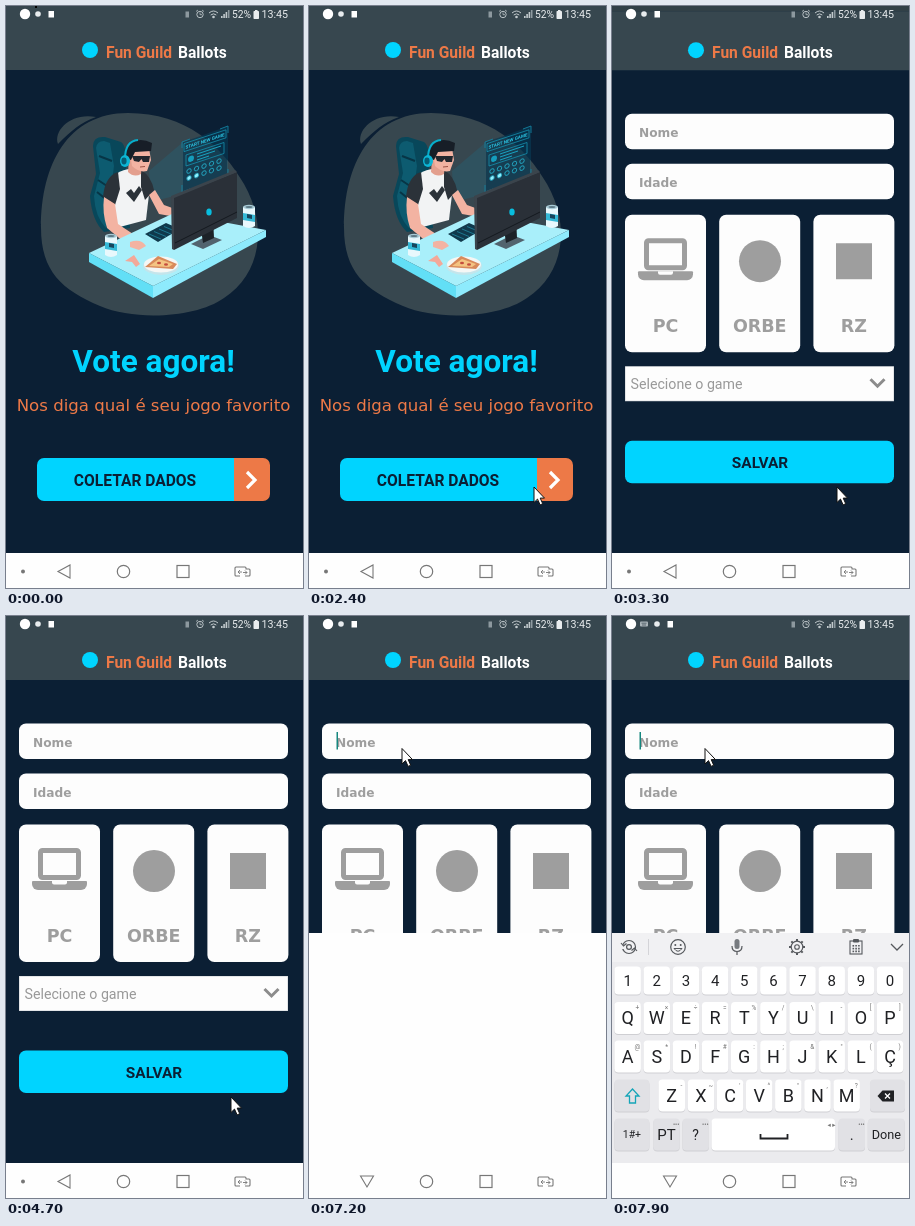
Recreate the animation shown at these times as an HTML page with a canvas. Size 297x582 px, loop 8 s.

```html
<!DOCTYPE html>
<html lang="pt">
<head>
<meta charset="utf-8">
<title>Vote agora</title>
<style>
html, body { margin: 0; width: 100%; height: 100%; overflow: hidden; background: #0b1f34; }
canvas { display: block; width: 297px; height: 582px; }
</style>
</head>
<body>
<canvas id="stage"></canvas>
<script>
const W = 297, H = 582, SCREEN_H = 547, KEYS_TOP = 317;
const LOOP = 8000, STEP = 100;
const NAVY = '#0b1f34', SLATE = '#37474f', CYAN = '#00d4ff', ORANGE = '#ed7947';
const GREY = '#9e9e9e', WHITE = '#fdfdfd', INK = '#55585c', SKIN = '#f3b3a2';
const ROBOTO = 'Roboto, sans-serif', WIDE = '"DejaVu Sans", sans-serif';

const canvas = document.getElementById('stage');
const c = canvas.getContext('2d');
const dpr = window.devicePixelRatio || 1;
canvas.width = W * dpr;
canvas.height = H * dpr;

const clamp = v => Math.max(0, Math.min(1, v));

function rect(color, x, y, w, h, r = 0) {
  c.fillStyle = color;
  c.beginPath();
  c.roundRect(x, y, w, h, r);
  c.fill();
}
function disc(color, x, y, rx, ry = rx) {
  c.fillStyle = color;
  c.beginPath();
  c.ellipse(x, y, rx, ry, 0, 0, 7);
  c.fill();
}
function ring(color, x, y, r, lw = 1) {
  c.strokeStyle = color;
  c.lineWidth = lw;
  c.beginPath();
  c.arc(x, y, r, 0, 7);
  c.stroke();
}
function fill(color, d) {
  c.fillStyle = color;
  c.fill(new Path2D(d));
}
function line(color, d, lw = 1) {
  c.strokeStyle = color;
  c.lineWidth = lw;
  c.stroke(new Path2D(d));
}
function text(s, x, y, font, color, align = 'left') {
  c.font = font;
  c.fillStyle = color;
  c.textAlign = align;
  c.fillText(s, x, y);
}
function group(draw) {
  c.save();
  draw();
  c.restore();
}
function clipBelow(y, h) {
  c.beginPath();
  c.rect(0, y, W, h);
  c.clip();
}

function bezierEase(x1, y1, x2, y2) {
  const at = (s, a, b) => 3 * (1 - s) ** 2 * s * a + 3 * (1 - s) * s * s * b + s ** 3;
  return x => {
    let lo = 0, hi = 1;
    for (let i = 0; i < 24; i++) {
      const mid = (lo + hi) / 2;
      if (at(mid, x1, x2) < x) lo = mid; else hi = mid;
    }
    return at(lo, y1, y2);
  };
}
const revealEase = bezierEase(0.208, 0.82, 0.25, 1);

function header() {
  rect(NAVY, 0, 0, W, SCREEN_H + 15);
  rect(SLATE, 0, -10, W, 74);
  disc(CYAN, 84, 44, 8);
  text('Fun Guild', 100, 52, 'bold 15.6px ' + ROBOTO, ORANGE);
  text('Ballots', 172, 52, 'bold 15.6px ' + ROBOTO, '#fff');
}

function can(x, y) {
  fill('#e9f8fc', `M${x - 6} ${y - 9}h12v19q-6 4-12 0z`);
  fill('#35b9d6', `M${x - 6} ${y - 3}l12 2v7l-12-2z`);
  fill('#17455c', `M${x - 2} ${y - 2}l5 1v4l-5-1z`);
  disc('#a8cbd6', x, y - 9, 6, 2.2);
  disc('#5e7a86', x, y - 9, 3.5, 1.1);
}

function hologram() {
  fill('rgba(0,150,185,.15)', 'M143 165L176 137L222 120V168L168 190L145 196z');
  fill('rgba(6,48,72,.6)', 'M177 136L221 121V169L177 186z');
  line('#1381a0', 'M176 142V136L184 133M214 123L222 120V127M222 163V169L214 172M184 183L176 186V179', .9);
  group(() => {
    c.transform(1, -.33, 0, 1, 177, 136);
    c.strokeStyle = '#1695b4';
    c.lineWidth = .7;
    c.strokeRect(1, 2, 42, 8);
    text('START NEW GAME', 22, 7.8, 'bold 4.6px ' + ROBOTO, '#2bc3e2', 'center');
    c.strokeRect(3, 14, 38, 11);
    disc('#159dbc', 8, 19.5, 3);
    for (let i = 0; i < 3; i++) rect('#1aa5c4', 14, 16 + i * 3, 24 - i * 6, 1.1);
    for (let i = 0; i < 10; i++) ring('#24b2cf', 6 + i % 5 * 7.5, 31 + Math.floor(i / 5) * 7, 2.2, .8);
    disc('#8af0ff', 6, 38, 1.8);
    disc('#8af0ff', 13.5, 38, 1.8);
  });
}

function gamer() {
  // chair
  fill('#08475a', 'M87 140Q87 130 99 131L115 136Q121 140 120 160L124 222L98 226Q86 215 84 190L90 168z');
  fill('#0d5b70', 'M90 142Q91 135 98 135L104 137L108 160L100 222Q89 211 88 190L94 167z');
  line('#073546', 'M93 150L106 155M91 186L101 194M92 174L101 180', 2);
  // body
  fill('#f2f3f4', 'M110 168Q122 160 136 165L144 180L140 214L110 222L106 190z');
  fill('#2b3239', 'M112 166Q99 170 97 191L109 199L114 183z');
  fill('#2b3239', 'M135 164Q145 170 148 184L139 194L135 181z');
  fill('#2b3239', 'M120 187L125 183L128 187L133 180L136 184L128 196z');
  fill(SKIN, 'M98 191L109 198L112 218L139 236Q142 240 137 243L124 241L101 222Q96 207 98 191z');
  fill(SKIN, 'M143 189L149 184L158 199L172 204L170 211L153 208z');
  // head
  fill('#e39f8e', 'M123 153L136 158L135 168Q128 172 122 166z');
  fill(SKIN, 'M123 142H143L145 154L141 165Q133 167 126 160z');
  fill('#171e27', 'M120 152Q117 140 125 137Q134 131 146 137L145 145L129 146L125 154z');
  fill('#22272e', 'M126 150L144 150L143 156L137 156L135.5 153L133 156L128 155z');
  line('#9b5144', 'M134 161L139 160.5', 1);
  line('#07aecb', 'M119 153Q119 135 132 134', 2);
  disc('#0cb6d5', 119, 155, 5, 6);
  disc('#075c73', 118, 155, 2.6, 3.4);
}

function desk() {
  fill('#a9effa', 'M83 247L168 207L260 224L147 280z');
  fill('#62dff6', 'M83 247L147 280V292L83 256z');
  fill('#8eebfd', 'M147 280L260 224V231L147 292z');
  fill('#10394c', 'M139 228L160 217L174 223L152 236z');
  for (let i = 0; i < 4; i++) line('#207f98', `M${143 + i * 5} ${228 - i * 2.5}l12 5`, .9);
  can(105, 239);
  can(243, 210);
  // monitor
  fill('#52636e', 'M185 238L203 229L216 234L197 243z');
  fill('#1c2228', 'M194 216L207 211L208 232L197 237z');
  fill('#2a3038', 'M168 191L231 166V212L168 244z');
  fill('#3b444c', 'M165 190L229 164L231 166L168 192V244L166 243z');
  line('#14191f', 'M169 237L231 206', 1);
  disc('#08bedf', 203, 206, 2.7, 3.5);
  // food
  disc('#c4e5eb', 155, 260, 18, 9);
  disc('#f5f7f5', 155, 258.5, 17, 8);
  fill('#d88a5b', 'M139 261L152 250L171 258L167 263z');
  fill('#f4c482', 'M143 260L153 253L167 258L163 261z');
  disc('#c44d3e', 153, 257, 2, 1.3);
  disc('#c44d3e', 160, 258.5, 2, 1.3);
  fill('#f3a899', 'M119 255L128 249L134 258L130 261L126 256z');
  fill(SKIN, 'M124 236Q135 232 140 240L133 244L124 241z');
}

function home() {
  header();
  fill(SLATE, 'M35 222C35 158 62 107 122 107C180 107 216 140 238 178C262 220 255 268 218 292C190 312 129 315 94 300C56 284 35 265 35 222z');
  fill(SLATE, 'M52 138C47 124 66 106 90 111C74 117 66 124 52 138z');
  hologram();
  gamer();
  desk();
  text('Vote agora!', 147.5, 366, 'bold 31.5px ' + ROBOTO, CYAN, 'center');
  text('Nos diga qual é seu jogo favorito', 147.5, 405, '16.6px ' + WIDE, ORANGE, 'center');
  rect(CYAN, 31, 452, 198, 43, [7, 0, 0, 7]);
  rect(ORANGE, 228, 452, 36, 43, [0, 7, 7, 0]);
  text('COLETAR DADOS', 129, 480, 'bold 15.6px ' + ROBOTO, NAVY, 'center');
  line('#fff', 'M241 466L249 474L241 482', 3.2);
}

function form() {
  header();
  const labelFont = 'bold 12.2px ' + WIDE;
  ['Nome', 'Idade'].forEach((label, i) => {
    const y = 107.5 + i * 50;
    rect(WHITE, 13, y, 269, 35.5, 7);
    text(label, 27, y + 23, labelFont, GREY);
  });
  ['PC', 'ORBE', 'RZ'].forEach((label, i) => {
    const x = 13 + i * 94.2;
    rect(WHITE, x, 208.5, 81, 137.5, 7);
    text(label, x + 40.5, 326, 'bold 17.5px ' + WIDE, GREY, 'center');
  });
  c.strokeStyle = GREY;
  c.lineWidth = 5;
  c.beginPath();
  c.roundRect(34.5, 234.5, 38, 27, 2);
  c.stroke();
  rect(GREY, 26, 265, 55, 9, [1, 1, 6, 6]);
  rect(WHITE, 46, 265, 15, 3.5, [0, 0, 2, 2]);
  disc(GREY, 148, 255, 21);
  rect(GREY, 224, 237, 36, 36);
  rect('#c9cdd1', 13, 360, 269, 35);
  rect(WHITE, 13.5, 360.5, 268, 34);
  text('Selecione o game', 18.5, 382.5, '14.2px ' + ROBOTO, '#999');
  line('#8c8c8c', 'M258.5 373L265.5 380L272.5 373', 3);
  rect(CYAN, 13, 434.5, 269, 42.5, 7);
  text('SALVAR', 148, 462, 'bold 15.4px ' + ROBOTO, NAVY, 'center');
}

function statusBar(t) {
  const pale = '#e8ecee', dim = '#8d999f';
  const shift = t >= 7500 ? 13 : 0;
  if (t < 300) rect('#000', 29, 0, 2, 2);
  disc('#fff', 19, 8, 5.2);
  if (shift) {
    rect('#aab4b9', 28, 5.5, 8, 5, 1);
    line(SLATE, 'M29.5 7.2h5M30 9h4', .7);
  }
  disc(pale, 32 + shift, 8, 2.8);
  rect('#fff', 42.5 + shift, 5, 5.5, 6.5);
  rect(dim, 179.5, 5.5, 3.5, 6);
  ring('#b8c1c5', 194, 8.5, 3.2, 1);
  line('#b8c1c5', 'M194 6.5V8.7H196M190 5.5L192 4M196 4L198 5.5', .8);
  line('#c2cacd', 'M203 7Q207.5 3 212 7M204.7 9Q207.5 6.6 210.3 9', 1);
  disc('#c2cacd', 207.5, 11, 1.3);
  for (let i = 0; i < 4; i++) rect(i < 3 ? '#c2cacd' : dim, 215 + i * 2.3, 10 - i * 2, 1.6, 2 + i * 2);
  text('52%', 226, 12, '10.3px ' + ROBOTO, pale);
  rect(pale, 247.5, 5, 5.5, 8, .7);
  rect(pale, 249, 4, 2.5, 1.5);
  text('13:45', 282, 12.2, '10.7px ' + ROBOTO, pale, 'right');
}

function navBar(typing) {
  const ink = '#777';
  rect('#fefefe', 0, SCREEN_H, W, H - SCREEN_H);
  if (typing) line(ink, 'M51.5 560H64.5L58 571z', 1.1);
  else {
    disc(ink, 17, 565.5, 2);
    line(ink, 'M52 565.5L64 559V572z', 1.1);
  }
  ring(ink, 117.5, 565.5, 6.2, 1.2);
  c.strokeRect(171, 559.5, 12, 12);
  line(ink, 'M234 570H230Q229 570 229 569V562Q229 561 230 561H239Q240 561 240 562V563H243Q244 563 244 564V569Q244 570 243 570H239', 1.1);
  line(ink, 'M232 566H236M234 564L232 566L234 568M241 566.5H237M239 564.5L241 566.5L239 568.5', .9);
}

function key(x, y, w, h, label, size, hint, tone = '#fff') {
  rect('#cfcfd3', x, y + 1, w, h, 4);
  rect(tone, x, y, w, h, 4);
  if (label) text(label, x + w / 2, y + h / 2 + size * .36, size + 'px ' + ROBOTO, '#202124', 'center');
  if (hint) text(hint, x + w - 3.5, y + 8, '6.5px ' + ROBOTO, '#777', 'center');
}

function toolbar() {
  const y = 331;
  ring(INK, 17, y, 6.5, 1.2);
  rect('#f1f1f3', 9, y - 2, 4, 4);
  line(INK, `M9 ${y - 4}l2.5 3l3-2.5M25 ${y + 4}l-2.5-3l-3 2.5`, 1.1);
  ring(INK, 17, y, 2.4, 1.2);
  line('#d4d4d8', `M36.5 ${y - 8}V${y + 8}`);
  ring(INK, 66, y, 7.3, 1.2);
  disc(INK, 63.3, y - 2, 1);
  disc(INK, 68.7, y - 2, 1);
  line(INK, `M62 ${y + 1.5}Q66 ${y + 7} 70 ${y + 1.5}z`);
  rect('#777b80', 122.5, y - 8, 5, 10, 2.5);
  line(INK, `M120 ${y - 1}Q120 ${y + 4.5} 125 ${y + 4.5}Q130 ${y + 4.5} 130 ${y - 1}M125 ${y + 4.5}V${y + 8}`, 1.2);
  for (let i = 0; i < 8; i++) {
    const a = i * Math.PI / 4, dx = Math.cos(a), dy = Math.sin(a);
    line(INK, `M${185 + dx * 6} ${y + dy * 6}L${185 + dx * 8} ${y + dy * 8}`, 2);
  }
  ring(INK, 185, y, 5.8, 1.2);
  ring(INK, 185, y, 2.3, 1.1);
  c.strokeRect(238, y - 6, 12, 13);
  rect(INK, 241, y - 8, 6, 3.5, 1);
  for (let i = 0; i < 9; i++) rect(INK, 240.5 + i % 3 * 2.8, y - 2 + Math.floor(i / 3) * 2.8, 1.6, 1.6);
  line(INK, `M279 ${y - 3}L285 ${y + 3}L291 ${y - 3}`, 1.3);
}

function keyboard() {
  const soft = '#e1e1e5', left = 2.4;
  rect('#ebebee', 0, KEYS_TOP, W, 300);
  rect('#f1f1f3', 0, KEYS_TOP, W, 29);
  toolbar();
  const rows = [
    ['1234567890', '', 350.5, 28, 15],
    ['QWERTYUIOP', '+×÷=%/\\-[]', 386, 32, 18],
    ['ASDFGHJKLÇ', '@*!#:;&"()', 424.5, 32, 18]
  ];
  for (const [letters, hints, y, h, size] of rows)
    [...letters].forEach((ch, i) => key(left + i * 29.15, y, 26.5, h, ch, size, hints[i]));
  key(left, 463.5, 35, 32, '', 0, '', soft);
  line('#15a5b8', 'M20.5 473L27 480H23.5V487H17.5V480H14z', 1.3);
  [...'ZXCVBNM'].forEach((ch, i) => key(46.5 + i * 29.15, 463.5, 26.5, 32, ch, 18, '-~\'^",?'[i]));
  key(258, 463.5, 35, 32, '', 0, '', soft);
  fill('#202124', 'M265.5 480L270.5 474.5H282V485.5H270.5z');
  line('#fff', 'M273 477.5l5 5m0-5l-5 5', 1.3);
  const y = 502.5, h = 32;
  key(left, y, 35, h, '1#+', 10.5, '', soft);
  key(41.2, y, 26.5, h, 'PT', 15, '•••', soft);
  key(70.4, y, 26.5, h, '?', 14, '•••', soft);
  key(99.5, y, 123.5, h, '', 0, '◂ ▸');
  line('#202124', 'M148.5 518V522.5H175.5V518', 1.8);
  key(226.5, y, 26.5, h, '.', 15, '•••', soft);
  key(255.8, y, 37, h, 'Done', 12.7, '', soft);
}

// [time, x, y] of the pointer tip
const pointerPath = [
  [900, 277, 482], [1000, 258, 476], [1100, 234, 478], [1200, 224.5, 480.5],
  [4900, 224.5, 480.5], [5000, 223, 479.5], [5100, 222, 479], [5300, 222, 479],
  [5400, 221, 478.5], [5600, 221.5, 478], [5700, 221, 477], [5800, 221, 477],
  [5900, 201, 443], [6000, 165, 384], [6100, 129, 318], [6200, 107, 267],
  [6400, 100, 180], [6500, 95, 145], [6600, 92.5, 132], [LOOP, 92.5, 132]
];
function pointer(t) {
  const i = pointerPath.findIndex(k => k[0] > t);
  if (i < 1) return;
  const [t0, x0, y0] = pointerPath[i - 1], [t1, x1, y1] = pointerPath[i];
  const u = (t - t0) / (t1 - t0);
  c.translate(x0 + (x1 - x0) * u, y0 + (y1 - y0) * u);
  const arrow = 'M.5 .5V16L4 12.6L6.6 18.4L9.2 17.2L6.7 11.6H11z';
  fill('#fff', arrow);
  line('#111', arrow, 1);
}

function screens(t) {
  if (t < 3100) return home();
  if (t >= 3400) return form();
  const p = revealEase(clamp((t - 2982) / 425));
  group(() => {
    c.translate(0, -0.02 * SCREEN_H * p);
    home();
  });
  rect(`rgba(0,0,0,${Math.min(0.1, p / 3.6)})`, 0, 0, W, SCREEN_H);
  group(() => {
    clipBelow(SCREEN_H * (1 - p), SCREEN_H);
    c.translate(0, 0.041 * SCREEN_H * (1 - p));
    form();
  });
}

function render(t) {
  c.setTransform(dpr, 0, 0, dpr, 0, 0);
  const typing = t >= 7200;
  screens(t);
  statusBar(t);
  if (t >= 6900) rect('#16877f', 27.5, 116, 1.5, 17.5);
  if (typing) rect('#fefefe', 0, KEYS_TOP, W, H - KEYS_TOP);
  if (t >= 7400) group(() => {
    clipBelow(KEYS_TOP, SCREEN_H - KEYS_TOP);
    c.translate(0, 230 * (1 - clamp((t - 7300) / 600)) ** 3);
    keyboard();
  });
  navBar(typing);
  group(() => pointer(t));
}

const start = performance.now();
function tick() {
  const t = (performance.now() - start) % LOOP;
  render(Math.floor(t / STEP) * STEP);
  requestAnimationFrame(tick);
}
tick();
</script>
</body>
</html>
```
